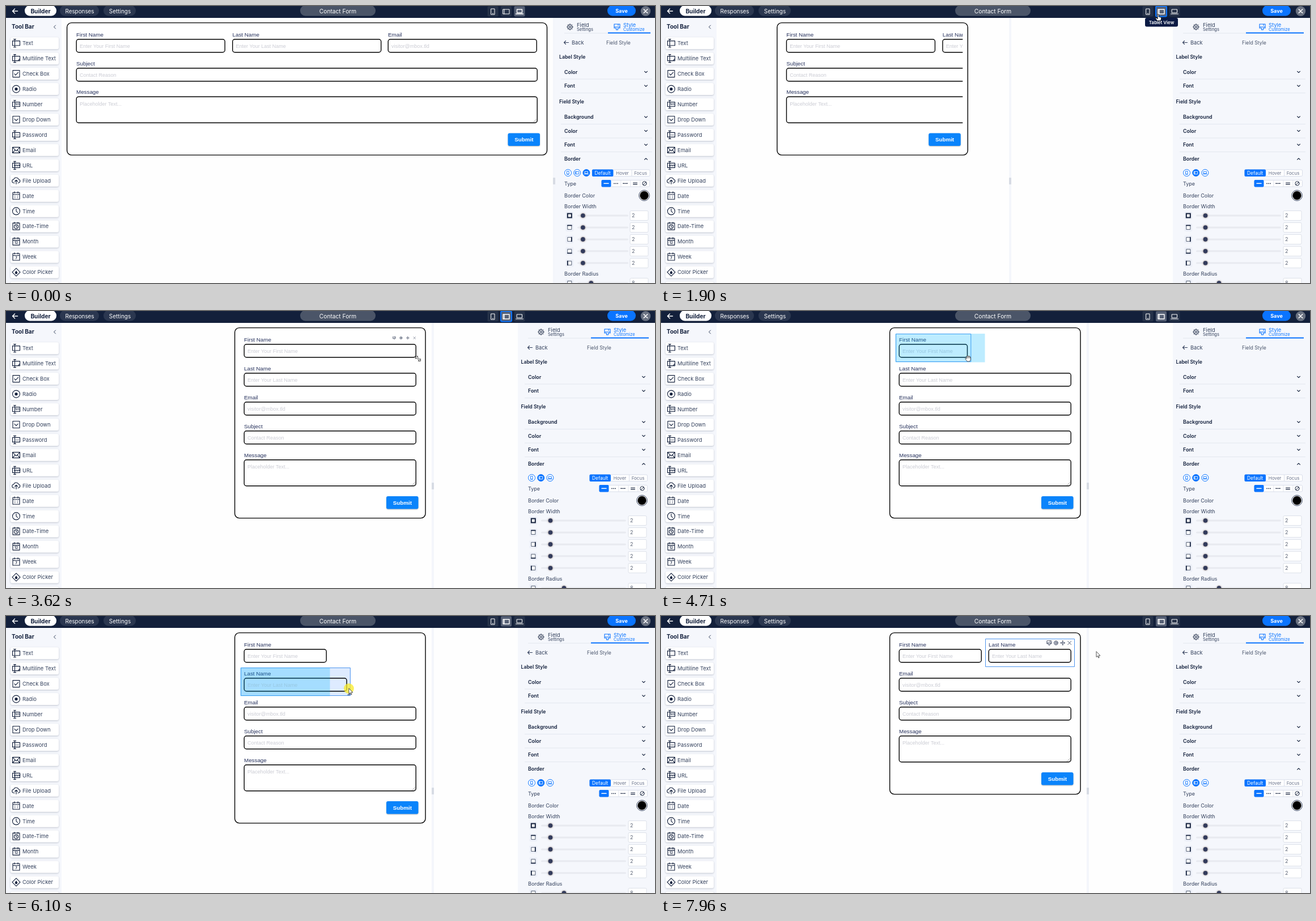
These frames come from a looping animation (1145x489 px, 8 s). An HTML page with a canvas:

```html
<!DOCTYPE html>
<html lang="en">
<head>
<meta charset="utf-8">
<title>Form builder</title>
<style>
html, body { margin: 0; height: 100%; overflow: hidden; background: #fff; }
canvas { display: block; width: 100vw; height: 100vh; }
</style>
</head>
<body>
<canvas id="stage" width="1145" height="489"></canvas>
<script>
const c = document.getElementById('stage').getContext('2d');
const LOOP = 8000, NAVY = '#14213d', BLUE = '#0a74ff', INK = '#33405c', PALE = '#f5f7fc';
const UI = 'Inter, sans-serif', FORM = '"Liberation Sans", Arial, sans-serif';

// ---------- helpers ----------
const mix = (a, b, p) => a + (b - a) * p;
const clamp = v => Math.max(0, Math.min(1, v));
const ease = (t, a, b) => {
  const p = clamp((t - a) / (b - a));
  return p < .5 ? 2 * p * p : 1 - 2 * (1 - p) * (1 - p);
};
const within = (t, a, b) => t >= a && t < b;

function text(s, x, y, size, color = INK, weight = 400, align = 'left', font = UI) {
  c.font = `${weight} ${size}px ${font}`;
  c.textAlign = align;
  c.fillStyle = color;
  c.fillText(s, x, y + size * .36);
}
function box(x, y, w, h, r, fill, stroke, lw = 1) {
  c.beginPath();
  c.roundRect(x, y, w, h, r);
  if (fill) { c.fillStyle = fill; c.fill(); }
  if (stroke) { c.strokeStyle = stroke; c.lineWidth = lw; c.stroke(); }
}
function disc(x, y, r, fill, stroke, lw = 1) { box(x - r, y - r, 2 * r, 2 * r, r, fill, stroke, lw); }
function path(d, x, y, color, lw = 1, fill) {
  const p = new Path2D(d);
  c.save();
  c.translate(x, y);
  c.lineCap = c.lineJoin = 'round';
  if (fill) { c.fillStyle = fill; c.fill(p); }
  if (color) { c.strokeStyle = color; c.lineWidth = lw; c.stroke(p); }
  c.restore();
}
function scaledPath(d, x, y, k, color, lw) {
  c.save();
  c.translate(x, y);
  c.scale(k, k);
  path(d, 0, 0, color, lw);
  c.restore();
}
function shadowed(draw, blur, dy, color) {
  c.save();
  c.shadowBlur = blur; c.shadowOffsetY = dy; c.shadowColor = color;
  draw();
  c.restore();
}

const ARROW_LEFT = 'M4.5 0H-4.5M-.5-4L-4.5 0L-.5 4';
const DOWN = 'M-2.4-1.2L0 1.2L2.4-1.2', UP = 'M-2.4 1.2L0-1.2L2.4 1.2';
const PHONE = 'M-3-5H3V5H-3ZM-.7 3.2H.7';
const TABLET = 'M-5.5-4H5.5V4H-5.5ZM-3.5-4V4';
const LAPTOP = 'M-4.5-4H4.5V2H-4.5ZM-6.5 4H6.5';
const GEAR = 'M4.1 0A4.1 4.1 0 1 1-4.1 0A4.1 4.1 0 1 1 4.1 0M1.7 0A1.7 1.7 0 1 1-1.7 0A1.7 1.7 0 1 1 1.7 0'
  + 'M0-5.4V-4.4M0 5.4V4.4M-5.4 0H-4.4M5.4 0H4.4M-3.8-3.8L-3-3M3.8 3.8L3 3M-3.8 3.8L-3 3M3.8-3.8L3-3';
const BRUSH = 'M-5-5H5V2H1.5V5H-1.5V2H-5ZM-5 0H5M2-5V-2.5';
const MOVE = 'M-5 0H5M0-5V5M-3.5-1.5L-5 0L-3.5 1.5M3.5-1.5L5 0L3.5 1.5M-1.5-3.5L0-5L1.5-3.5M-1.5 3.5L0 5L1.5 3.5';
const CROSS = 'M-4-4L4 4M4-4L-4 4';
const BEAM = 'M-4.5-7H-.5M-4.5 7H-.5M-2.5-7V7M-2.5-4H-6.5V4H-2.5M-2.5-4H6.5V4H-2.5';
const BOXED = 'M-6-6H6V6H-6Z', ROUND = 'M6.5 0A6.5 6.5 0 1 1-6.5 0A6.5 6.5 0 1 1 6.5 0';
const CAL = BOXED + 'M-6-2.5H6M-3-7.5V-5M3-7.5V-5';

const TOOLS = [
  ['Text', BEAM], ['Multiline Text', BEAM + 'M3 4L6 1'], ['Check Box', BOXED + 'M-3 0L-1 2.5L3.5-2.5'],
  ['Radio', ROUND, '●'], ['Number', BEAM, '123'], ['Drop Down', BOXED + 'M-3-1L0 2L3-1'],
  ['Password', BEAM, '•••'], ['Email', 'M-6.5-5H6.5V5H-6.5ZL0 1.5L6.5-5M-6.5 5L-2 0M6.5 5L2 0'],
  ['URL', BEAM, 'www'], ['File Upload', 'M-3 4H-4A3 3 0 0 1-4.5-2A4.5 4.5 0 0 1 4-2.5A3.3 3.3 0 0 1 4 4H3M0 6V-1M-2.5 1.5L0-1L2.5 1.5'],
  ['Date', CAL + 'M-2.5 .5H-2M2 .5H2.5M-2.5 3.3H-2M2 3.3H2.5'], ['Time', ROUND + 'M0-4V0L2.5 2.5'],
  ['Date-Time', BOXED + 'M-3-7.5V-5M3-7.5V-5M3.5 .5A3.5 3.5 0 1 1-3.5 .5A3.5 3.5 0 1 1 3.5 .5M0-1.2V.5L1.2 1.5'],
  ['Month', CAL, '12'], ['Week', CAL, '7'], ['Color Picker', 'M0-7L7 0L0 7L-7 0Z'], ['', '']
];

function toolbar() {
  box(0, 21, 98, 468, 0, PALE);
  text('Tool Bar', 10, 36, 10, NAVY, 700);
  path('M1.5-3L-1.5 0L1.5 3', 86, 37, INK);
  TOOLS.forEach(([name, icon, mark], i) => {
    const y = 65.7 + i * 26.95;
    shadowed(() => box(8, y - 10.5, 85, 21, 3, '#fff'), 3, 1, 'rgba(20,33,61,.24)');
    path(icon, 18, y, NAVY, 1.15);
    if (mark === '●') disc(18, y, 2.6, NAVY);
    else if (mark) text(mark, i > 12 ? 18 : 19.8, y + (i > 12 ? 1.8 : 0), i > 12 ? 5.5 : 4.5, NAVY, 700, 'center');
    if (name === 'Color Picker') path('M0-3L2 .3A2.2 2.2 0 1 1-2 .3Z', 18, y, null, 1, NAVY);
    text(name, 29, y, 9.4);
  });
}

function header(t, tablet) {
  box(0, 0, 1145, 21, 0, '#13203b');
  path(ARROW_LEFT, 16, 9, '#fff', 1.5);
  [[33, 56, '#fff'], [95, 69, '#2b3750'], [172, 57, '#2b3750'], [519, 133, '#4b5568'], [1061, 50, BLUE]]
    .forEach(([x, w, fill]) => box(x, -1, w, 18.5, 9, fill));
  text('Builder', 61, 9, 10.2, NAVY, 700, 'center');
  text('Responses', 130, 9, 9.9, '#fff', 400, 'center');
  text('Settings', 201, 9, 10, '#fff', 400, 'center');
  text('Contact Form', 585.5, 9, 10.2, '#fff', 400, 'center');
  text('Save', 1086, 9, 9, '#fff', 700, 'center');
  const on = tablet ? 1 : 2, focus = within(t, 1670, 3930);
  [859, 882.5, 906].forEach((x, i) => {
    const active = i === on;
    box(x - 9.5, .5, 19, 18, 2, active ? '#566075' : '#263249', active && focus ? BLUE : null, 2);
    path([PHONE, TABLET, LAPTOP][i], x, 10, '#fff', active ? 1.4 : 1);
  });
  disc(1128.5, 9, 8.7, '#6a7282');
  path('M-3.3-3.3L3.3 3.3M3.3-3.3L-3.3 3.3', 1128.5, 9, '#fff', 1.5);
}

function handle(x) {
  box(x - 2, 21, 4, 468, 0, '#f4f6fb');
  path('M-1-5.5V5.5M1-5.5V5.5', x, 309, '#b4bac8', .9);
}

function panel(tablet) {
  const at = (a, b) => tablet ? b : a;
  const left = at(985, 921), right = at(1133, 1130), chev = at(1129, 1125);
  box(at(969, 903), 21, 300, 468, 0, PALE);

  path(GEAR, at(995, 944), 37, NAVY, 1);
  text('Field', at(1007, 956), 33.5, 9.5);
  text('Settings', at(1007, 956), 41.5, 7.5);
  path(BRUSH, at(1078, 1061), 37, BLUE, 1.1);
  text('Style', at(1089, 1072), 33.5, 9.3, BLUE);
  text('Customize', at(1089, 1072), 41.5, 7.5, BLUE);
  box(left, 47.5, at(152, 213), 1, 0, '#e4e8f0');
  box(at(1062, 1032), 46.5, at(75, 102), 2, 0, BLUE);

  path('M4 0H-4M-1-3L-4 0L-1 3', left + 3.5, 64.5, INK, 1.1);
  text('Back', left + 13, 64.5, 9.2);
  text('Field Style', at(1080.5, 1046.5), 64.5, 8.7, '#4a556b', 400, 'center');
  text('Label Style', at(976, 908.5), 89.5, 8.7, NAVY, 600);
  text('Field Style', at(976, 908.5), 169, 8.7, NAVY, 600);
  [['Color', 116.5], ['Font', 141], ['Background', 196], ['Color', 220.5], ['Font', 245], ['Border', 270]].forEach(([s, y], i) => {
    text(s, left, y, 8.9, NAVY, 600);
    path(i === 5 ? UP : DOWN, chev, y, NAVY, 1.2);
    if (i < 5) box(left - 6, y + 12, right - left + 13, 1, 0, '#e3e7ef');
  });

  [PHONE, TABLET, LAPTOP].forEach((d, i) => {
    const x = left + 6.5 + i * 16.2, on = i === at(2, 1);
    disc(x, 294.5, 6, on ? BLUE : '#fff', BLUE);
    scaledPath(d, x, 294.5, .56, on ? '#fff' : BLUE, 1.6);
  });
  const g = at(1034, 1029.5);
  box(g, 289, 102, 11.5, 2, '#fff', '#d9deea');
  box(g, 288.5, 37.5, 12.5, 2, BLUE);
  box(g + 69.5, 289, 1, 12, 0, '#d9deea');
  text('Default', g + 18.7, 295, 8.3, '#fff', 400, 'center');
  text('Hover', g + 53.5, 295, 8, '#66708a', 400, 'center');
  text('Focus', g + 85.5, 295, 8, '#66708a', 400, 'center');

  text('Type', left, 313.5, 9);
  const k = at(1050.5, 1046.5);
  box(k, 307.5, 85, 11.5, 2, '#fff', '#d9deea');
  box(k, 307, 17, 12.5, 2, BLUE);
  for (let i = 2; i < 5; i++) box(k + i * 17, 308, .8, 11, 0, '#d9deea');
  path('M-4 0H4', k + 8.5, 313.3, '#fff', 1.5);
  [-3, 0, 3].forEach(d => disc(k + 25.5 + d, 313.3, .9, NAVY));
  [-3.3, -1.1, 1.1, 3.3].forEach(d => box(k + 42 + d - .8, 312.6, 1.6, 1.4, 0, NAVY));
  path('M-3.5-1.3H3.5M-3.5 1.3H3.5', k + 59.5, 313.3, NAVY, 1.1);
  path('M3.6 0A3.6 3.6 0 1 1-3.6 0A3.6 3.6 0 1 1 3.6 0M-2.4 2.4L2.4-2.4', k + 76, 313.3, NAVY);

  text('Border Color', left, 334.5, 9);
  disc(at(1126, 1122), 334.5, 9.3, '#fff', INK);
  disc(at(1126, 1122), 334.5, 7.7, '#000');
  text('Border Width', left, 353.5, 9.1);
  text('Border Radius', left, 473, 9.1);

  const start = at(1008, 944), span = at(90, 150);
  for (let i = 0; i < 6; i++) {
    const y = i < 5 ? 370 + i * 20.95 : 489, x = left + 9.3, knob = start + span * (i < 5 ? .11 : .27);
    box(x - 7, y - 7, 14, 14, 2, '#edf0f8');
    box(x - 3.5, y - 3.5, 7, 7, 0, '#fff', NAVY, i ? .7 : 2);
    path(['', 'M-3.5-3.5H3.5', 'M3.5-3.5V3.5', 'M-3.5 3.5H3.5', 'M-3.5-3.5V3.5', ''][i], x, y, NAVY, 1.8);
    box(start, y - 1.5, span, 3, 1.5, '#e8eaf0');
    shadowed(() => disc(knob, y, 3.8, '#323b5c'), 3, 0, 'rgba(80,50,30,.7)');
    box(right - 32, y - 8.5, 32, 17, 2, '#fff', '#dde1e9');
    text(i < 5 ? '2' : '8', right - 29, y, 9, '#5c6577');
  }
}

// ---------- form ----------
const QUARTER = 79;
const FIELDS = [
  ['First Name', 'Enter Your First Name'], ['Last Name', 'Enter Your Last Name'],
  ['Email', 'visitor@mbox.tld'], ['Subject', 'Contact Reason'], ['Message', 'Placeholder Text...']
];
const DESK = [[0, 0, 275], [275.5, 0, 275], [550, 0, 275], [0, 1, 826], [0, 1.99, 826]];

// time, x, y of the pointer
const TRACK = [
  [370, 1053, 474], [520, 956, 180], [830, 956, 180], [1590, 877, 14], [3070, 877, 14], [3520, 726, 84],
  [3930, 726, 84], [4480, 541, 83], [4710, 541, 83], [5390, 726, 135], [5710, 726, 135], [6100, 605, 128],
  [6400, 571, 132], [6500, 500, 96], [6570, 500, 96], [7270, 631, 64], [7360, 656, 45], [7800, 656, 45], [7960, 768, 63]
];
function pointer(t) {
  const i = TRACK.findIndex(k => k[0] > t);
  if (i < 0) return TRACK[TRACK.length - 1].slice(1);
  if (!i) return [-99, -99];
  const [a, b] = [TRACK[i - 1], TRACK[i]], p = (t - a[0]) / (b[0] - a[0]);
  return [mix(a[1], b[1], p), mix(a[2], b[2], p)];
}

function fieldBoxes(t, formX) {
  const [mx, my] = pointer(t);
  const stack = ease(t, 1920, 2220), lift = 51 * ease(t, 7210, 7490);
  const boxes = DESK.map(([x, row, w], i) => ({
    x: formX + 11 + mix(x, 0, stack), y: mix(40 + row * 51, 40 + i * 51, stack) - (i > 1 ? lift : 0),
    w: mix(w, 316, stack), h: i < 4 ? 50 : 74
  }));
  // the right edge follows the pointer, then snaps to half the row
  const resize = (b, start, end, grip, last) => {
    if (t >= start) b.w = t < end ? Math.min(316, mx + grip - b.x) : mix(last, 2 * QUARTER, ease(t, end, end + 130));
  };
  resize(boxes[0], 3930, 4720, 6, 133);
  resize(boxes[1], 5710, 6400, 3, 160);
  if (t >= 6570) {
    const drop = ease(t, 7400, 7490), b = boxes[1];
    b.x = mix(mx - 86, formX + 11 + 2 * QUARTER, drop);
    b.y = mix(my - 5, 40, drop);
  }
  return boxes;
}

function field(b, i, s = {}) {
  const tall = i === 4;
  if (s.fill) box(b.x, b.y, b.w, b.h, 0, s.fill);
  text(FIELDS[i][0], b.x + 6, b.y + 10.2, 9.8, '#26315c', 400, 'left', FORM);
  box(b.x + 6.2, b.y + 18.7, b.w - 13, tall ? 46 : 23, 4, s.fill ? null : '#fff', '#000', 1.4);
  text(FIELDS[i][1], b.x + 12, b.y + 31, 9, '#cbccd4', 400, 'left', FORM);
  if (tall) path('M-5 0L0-5M-2 0L0-2', b.x + b.w - 8.5, b.y + 63.5, '#777', .7);
  if (s.border) box(b.x + .5, b.y + .5, b.w - 1, b.h - 1, 0, null, '#4d94ee');
  if (s.icons) [BRUSH, GEAR, MOVE, CROSS].forEach((d, n) =>
    scaledPath(d, b.x + b.w - 45 + n * 11.9, b.y + 7.5, .75 * s.icons, '#36415c', 1.2));
  if (s.fill) path('M-3 0H0V-3', b.x + b.w - 2, b.y + b.h - 2, NAVY, 1.2);
}

function form(t) {
  const tablet = t >= 1670, slide = ease(t, 1670, 2240);
  const x = mix(107, 403, slide), w = tablet ? 337 : 847.5;
  const boxes = fieldBoxes(t, x), base = boxes[4].y;
  handle(tablet ? mix(549, 753, slide) : 967);
  box(x + .6, 29.6, w - .6, base + 92, 8, '#fff', '#000', 1.4);

  const resizing = within(t, 3930, 4720) || within(t, 5710, 6400), dragging = within(t, 6570, 7450);
  const pressed = within(t, 3930, 4480) || within(t, 5710, 6400);
  // hover styles lag a little behind the pointer
  const [hx, hy] = pointer(t - 90);
  let hot = boxes.findIndex(b => hx >= b.x && hx < b.x + b.w + 2 && hy >= b.y && hy < b.y + b.h);
  if (resizing) hot = t < 5000 ? 0 : 1;
  if (dragging) hot = 1;
  const grow = within(t, 3500, 3700) ? .6 : 1;
  const hover = {
    border: grow === 1, icons: resizing ? 0 : grow,
    fill: dragging ? '#dfecfd' : pressed ? 'rgba(0,105,255,.13)' : null
  };
  const drawField = i => field(boxes[i], i, i === hot ? hover : {});

  c.save();
  c.beginPath();
  c.rect(x + 2, 31, w - 11, 458);
  c.clip();
  [0, 2, 3, 4].forEach(drawField);
  if (!dragging) drawField(1);
  if (resizing || dragging) {
    let col = 0, row = hot, cols = 2;
    if (resizing) cols = Math.max(2, Math.round(boxes[hot].w / QUARTER));
    else if (t >= 7290) { col = 2; row = 0; }
    else if (t >= 6930) col = 1;
    box(x + 10.5 + col * QUARTER, 40 + row * 51, cols * QUARTER, 50.5, 0, 'rgba(0,181,255,.26)');
  }
  if (dragging) drawField(1);
  c.restore();

  shadowed(() => box(x + w - 69, base + 83, 56.5, 22.5, 3, '#0a84fb'), 2, 1, 'rgba(0,0,0,.25)');
  text('Submit', x + w - 40.7, base + 94.3, 9.8, '#fff', 700, 'center', FORM);
}

function cursor(t) {
  if (t < 370) return;
  const [x, y] = pointer(t);
  if (within(t, 3930, 4450) || within(t, 5710, 6400) || within(t, 6570, 7420)) disc(x, y, 9, 'rgba(250,235,40,.75)');
  if (within(t, 1540, 3120)) {
    path('M-1 1Q0-1 1 1V5L5 6Q6 6.5 5.5 9L4.5 12H-1.5L-4.5 8Q-4.5 6.5-3 7L-1 8.5Z', x, y, '#000', .8, '#fff');
  } else if (within(t, 3500, 4440) || within(t, 5340, 5710)) {
    path('M-4-4H0L-1.3-2.7L3 1.6L4.3 .3V4.3H.3L1.6 3L-2.7-1.3L-4 0Z', x + 1, y, '#000', .8, '#fff');
  } else if (within(t, 6570, 7420)) {
    path('M-3.5-1Q-3-4-1.5-3Q0-4.5 1.5-3Q3.5-4 3.5-1V1.5L2 4H-1.5L-3.5 1.5Z', x, y, '#6b6420', .8);
  } else if (within(t, 4440, 4800) || within(t, 6450, 7800)) {
    path('M-4 0L-2 1V-3Q-1-4.5 0-3Q1-5 2-3Q3-4.5 4-2Q5-2.5 5 0V3L3 6H-1L-4 2Q-5 .5-4 0M0-3V0M2-3V0M4-2V0', x, y, '#333', .8, '#fff');
  } else {
    path('M0 0V9.5L2.2 7.5L3.8 11L5.2 10.3L3.7 7H6.6Z', x, y, '#444', .9, '#fff');
  }
}

function draw(t) {
  const tablet = t >= 1670;
  box(0, 0, 1145, 489, 0, '#fefefe');
  form(t);
  toolbar();
  panel(tablet);
  header(t, tablet);
  if (within(t, 1590, 3070)) {
    box(854, 21, 58, 15.5, 3, '#0b1a44');
    text('Tablet View', 883, 28.8, 7.9, '#fff', 600, 'center');
  }
  cursor(t);
}

function frame() {
  draw(performance.now() % LOOP);
  requestAnimationFrame(frame);
}
frame();
</script>
</body>
</html>
```
